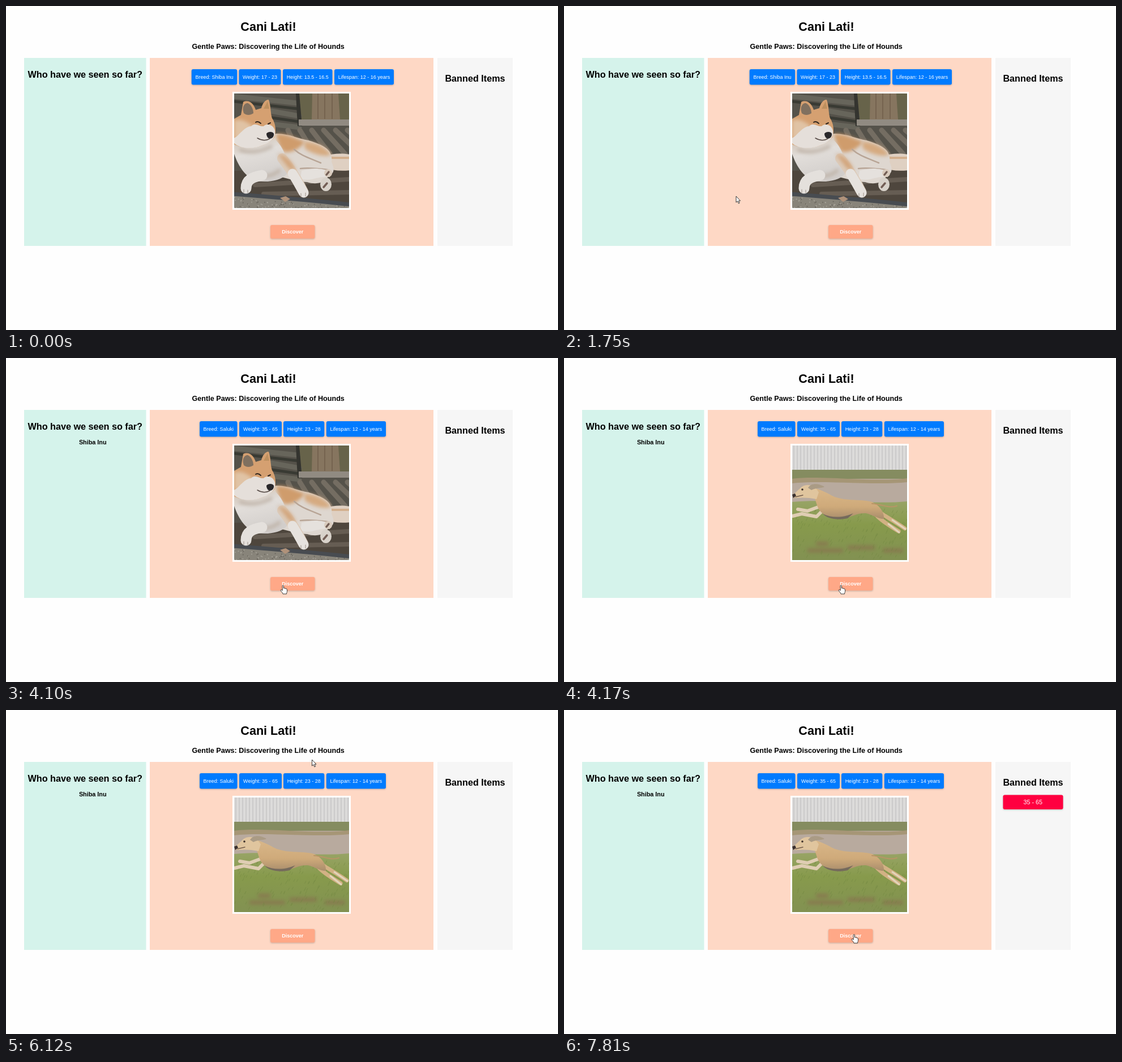
These frames come from a looping animation (975x574 px, 8000 ms). An HTML page:

```html
<!DOCTYPE html>
<html lang="en">
<head>
<meta charset="utf-8">
<title>Dog discovery</title>
<style>
  html, body { margin: 0; width: 100%; height: 100%; overflow: hidden; background: #fefefe; }
  svg { display: block; width: 975px; height: 574px; }
  text { font-family: "Liberation Sans", Arial, sans-serif; text-anchor: middle; }
  .bold { font-weight: 700; }
  .h2 { font-weight: 700; font-size: 16.2px; }
  .small { font-size: 9px; fill: #fff; }
  .raised { filter: drop-shadow(0 1.4px 1.4px rgba(0, 0, 0, .22)); }
  .line { fill: none; stroke-linecap: round; stroke-linejoin: round; }
  .soft { filter: blur(3px); }
</style>
</head>
<body>
<svg viewBox="0 0 975 574">
  <defs>
    <clipPath id="photoClip"><rect x="403" y="155" width="203" height="203"/></clipPath>
    <linearGradient id="chest" x1="0" y1="0" x2=".3" y2="1">
      <stop offset="0" stop-color="#cfc0b1"/><stop offset=".4" stop-color="#e2deda"/><stop offset="1" stop-color="#d2cecb"/>
    </linearGradient>
    <linearGradient id="lawn" x1="0" y1="0" x2="0" y2="1">
      <stop offset="0" stop-color="#98a466"/><stop offset=".4" stop-color="#879a4c"/><stop offset="1" stop-color="#829152"/>
    </linearGradient>
    <linearGradient id="tan" x1="0" y1="0" x2="0" y2="1">
      <stop offset="0" stop-color="#d9b789"/><stop offset=".6" stop-color="#cfaa7a"/><stop offset="1" stop-color="#a98d6c"/>
    </linearGradient>
  </defs>

  <rect width="975" height="574" fill="#fefefe"/>
  <text class="bold" x="463.5" y="44" font-size="21.6">Cani Lati!</text>
  <text class="bold" x="463.2" y="75.5" font-size="12.64">Gentle Paws: Discovering the Life of Hounds</text>

  <rect x="32" y="92" width="215.5" height="333" fill="#d5f3eb"/>
  <rect x="254" y="92" width="501" height="333" fill="#fed8c5"/>
  <rect x="762" y="92" width="133" height="333" fill="#f6f6f6"/>
  <text class="h2" x="139.7" y="127">Who have we seen so far?</text>
  <text class="h2" x="828.5" y="133.8">Banned Items</text>
  <text id="seen" class="bold" x="153.2" y="153.3" font-size="10.8">Shiba Inu</text>
  <g id="banned">
    <rect class="raised" x="775.5" y="150.5" width="106" height="25.5" rx="3" fill="#ff0040"/>
    <text x="828.3" y="166.8" font-size="10.8" fill="#fff">35 - 65</text>
  </g>
  <g id="chipsA"></g>
  <g id="chipsB"></g>

  <rect x="400" y="152" width="209" height="209" fill="#fff"/>
  <g clip-path="url(#photoClip)">
    <g id="shiba">
      <rect x="403" y="155" width="203" height="203" fill="#55524a"/>
      <!-- bench and trees -->
      <rect x="514" y="155" width="92" height="47" fill="#67634a"/>
      <path d="M541 155h46l3 46h-50z" fill="#86755f"/>
      <path d="M551 155v45M563 155v45M576 155v45" stroke="#75634f" stroke-width="2"/>
      <path class="line" d="M403 160L515 172M468 186L518 195M476 210L518 215" stroke="#67655b" stroke-width="9"/>
      <path class="line" d="M403 169L515 182M470 198L518 205" stroke="#393a33" stroke-width="5"/>
      <path d="M512 155h6l5 58h-8z" fill="#34342f"/>
      <path d="M517 201h89v11h-89z" fill="#918b82"/>
      <g id="slats" class="line" stroke="#746d62" stroke-width="9"></g>
      <path d="M403 292L606 287V358H403z" fill="#4e463d"/>
      <path class="line" d="M440 317L606 307M455 333L606 330" stroke="#665d53" stroke-width="8"/>
      <path d="M403 335L606 351V358H403z" fill="#88847a"/>
      <g id="stone"></g>
      <path class="line" d="M400 333C450 337 540 344 610 352" stroke="#484c51" stroke-width="7"/>
      <!-- tail, back and hind legs -->
      <path d="M562 266C580 260 596 261 608 263V291C590 293 575 291 560 286z" fill="#dfd0c2"/>
      <path class="line" d="M574 269L606 269" stroke="#d3b08f" stroke-width="4"/>
      <path d="M466 228C490 222 512 234 534 238C560 246 578 254 575 276C580 288 581 296 570 301C560 316 545 316 532 312C512 311 500 306 478 301z" fill="#ded7d0"/>
      <path class="soft" d="M476 227C495 224 512 235 528 240C520 253 502 262 490 258C482 250 480 238 476 227z" fill="#cf9c6c"/>
      <path class="soft" d="M526 240C548 240 568 252 574 264C560 268 542 262 528 253z" fill="#d5aa80"/>
      <path class="line" d="M509 254C522 266 538 270 556 278M520 288C536 286 552 288 568 290" stroke="#b8a596" stroke-width="2.5"/>
      <path d="M522 292C542 285 560 288 573 293L572 303C552 300 540 312 520 306z" fill="#e5e1dd"/>
      <ellipse cx="569" cy="296" rx="7" ry="7" fill="#d9cbbd"/>
      <ellipse cx="565" cy="316" rx="10" ry="12" fill="#d8d2ca"/>
      <path class="line" d="M566 299l4-5M561 321l6-7" stroke="#735e55" stroke-width="3.5"/>
      <!-- chest and front legs -->
      <path d="M403 237C420 250 455 248 473 235C490 247 500 275 496 298C484 310 464 313 440 310C420 300 409 280 403 262z" fill="url(#chest)"/>
      <path class="soft" d="M412 254C430 262 452 258 470 248M440 300C460 304 474 300 484 290" fill="none" stroke="#bfb3a8" stroke-width="6"/>
      <path class="line" d="M488 270C503 289 515 309 525 329" stroke="#dccab8" stroke-width="18"/>
      <path class="soft" d="M480 262C494 264 506 276 512 292L500 288z" fill="#d2a47a"/>
      <path class="line" d="M506 297C515 311 521 323 526 331" stroke="#e6e2de" stroke-width="17"/>
      <path class="line" d="M452 300C435 303 424 308 424 323" stroke="#e4e0dc" stroke-width="19"/>
      <path class="line" d="M420 331v-6M427 331v-5M521 338v-6M529 337v-6" stroke="#a89d95" stroke-width="1.2"/>
      <!-- head -->
      <path d="M415 193L419 170C430 165 438 174 441 184L451 181C453 172 459 165 464 166C468 177 467 190 470 199C476 207 478 222 474 233C455 254 421 255 403 245V200z" fill="#d5a071"/>
      <path class="soft" d="M403 203C413 198 430 206 436 214L420 238C412 240 406 236 403 232z" fill="#e0c3a5"/>
      <path d="M403 234C412 230 420 214 433 213C440 205 447 214 455 213C460 207 473 210 475 221C477 234 467 243 447 249C427 255 410 250 403 243z" fill="#e5dfda"/>
      <path d="M420 190C416 179 421 172 427 172C434 175 437 184 437 190C431 194 425 194 420 190z" fill="#80705f"/>
      <path d="M455 182L462 169L465 182z" fill="#bd905f"/>
      <path class="line" d="M441 206c3-2 6-1 9 2M463 209l4-2" stroke="#30261f" stroke-width="2"/>
      <path d="M460 226c3-4 11-4 13 0c1 5-3 9-7 9c-3 0-6-4-6-9z" fill="#29272a"/>
      <path class="line" d="M444 234C451 238 459 239 466 235" stroke="#554a45" stroke-width="1.5"/>
      <path d="M484 340l10-3l8 5l-9 5z" fill="#b0927a"/>
    </g>
    <g id="saluki">
      <rect x="403" y="155" width="203" height="46" fill="#dcdbda"/>
      <g id="fence" stroke="#cbcaca" stroke-width="2"></g>
      <rect x="403" y="198" width="203" height="20" fill="#858c60"/>
      <rect x="403" y="214" width="203" height="48" fill="#b8aa9e"/>
      <path d="M403 214C450 207 550 221 606 213V220C550 226 455 216 403 222z" fill="#a69676"/>
      <path d="M403 255C460 249 550 260 606 254V358H403z" fill="url(#lawn)"/>
      <path class="soft" d="M430 341h63M501 336h48M563 341h36M445 329h22" stroke="#89714f" stroke-width="7" opacity=".75"/>
      <g id="grass" class="line" stroke="#6f8540" opacity=".5"></g>
      <path class="line" d="M449 264L430 271L413 268M456 271L446 281L420 276L404 280" stroke="#dfcdb3" stroke-width="6"/>
      <path class="line" d="M545 271C556 285 570 294 591 307M548 267C566 280 581 287 602 302" stroke="#d2b184" stroke-width="7"/>
      <path class="line" d="M573 294L592 309M580 287L603 303" stroke="#e2d5bc" stroke-width="3"/>
      <path d="M437 230C452 231 465 240 478 246C500 254 526 250 544 255C558 261 566 274 565 285C553 285 544 277 533 275C513 274 506 286 483 284C466 284 452 276 447 261z" fill="url(#tan)"/>
      <path d="M457 276C475 285 496 282 511 275L501 284C482 288 466 285 457 276z" fill="#756a5c"/>
      <path class="line" d="M544 258C563 259 573 267 588 262" stroke="#b89567" stroke-width="2"/>
      <path d="M404 243L420 228C430 222 443 225 450 238L446 250C432 247 421 247 408 248z" fill="#e0c59e"/>
      <path d="M431 230C437 221 449 222 460 228C456 231 446 229 437 234z" fill="#aa9b85"/>
      <circle cx="421" cy="233" r="1.8" fill="#3b2f29"/>
      <path d="M403 242l5-2l2 4l-5 4z" fill="#3a302e"/>
      <path class="line" d="M409 246L422 243" stroke="#725b4b" stroke-width="1.5"/>
    </g>
  </g>

  <rect class="raised" x="467" y="388" width="78.5" height="24" rx="3" fill="#ffa887"/>
  <text class="small bold" x="506.2" y="402.8">Discover</text>

  <g id="ring" fill="none">
    <circle r="10" stroke="#000"/><circle r="9" stroke="#fff"/>
  </g>
  <path id="arrow" d="M.5 0V11L3 8.7L4.8 12.8L6.6 12L4.8 8.1H8z" fill="#fff" stroke="#222" stroke-width=".9"/>
  <path id="hand" d="M-1.3 9V.8C-1.3-.8 1-.8 1 .8V5C2 4.2 3.2 4.5 3.2 5.5C4.2 4.8 5.2 5.2 5.3 6.2C6.4 5.8 7 6.5 7 7.5V10.5C7 12.3 6 13 6 15H-.5C-.7 12.7-3 11.3-4.1 9.4C-5 7.8-3.5 6.8-2.3 8z" fill="#fff" stroke="#222" stroke-width=".9"/>
</svg>
<script>
const LOOP = 8000, NS = "http://www.w3.org/2000/svg";
const $ = id => document.getElementById(id);
const show = (id, on) => $(id).setAttribute("display", on ? "inline" : "none");

function add(parent, tag, attrs, label = "") {
  const node = document.createElementNS(NS, tag);
  for (const key in attrs) node.setAttribute(key, attrs[key]);
  node.textContent = label;
  parent.append(node);
}

function addChips(id, chips) {
  for (const [x, width, label] of chips) {
    add($(id), "rect", { class: "raised", x, y: 112, width, height: 27.5, rx: 3, fill: "#007bff" });
    add($(id), "text", { class: "small", x: x + width / 2, y: 129.1 }, label);
  }
}
addChips("chipsA", [
  [327.7, 80.5, "Breed: Shiba Inu"], [411.5, 74, "Weight: 17 - 23"],
  [489, 87.5, "Height: 13.5 - 16.5"], [580, 105, "Lifespan: 12 - 16 years"]
]);
addChips("chipsB", [
  [342, 66.5, "Breed: Saluki"], [412, 75, "Weight: 35 - 65"],
  [490, 72.3, "Height: 23 - 28"], [565.8, 105.2, "Lifespan: 12 - 14 years"]
]);

let seed = 7;
const random = () => (seed = seed * 16807 % 2147483647) / 2147483647;

for (let i = 0; i < 6; i++)
  add($("slats"), "path", { d: `M${498 + i * 21} 220L${518 + i * 27} 262` });
for (let i = 0; i < 150; i++) {
  const x = 403 + random() * 203, edge = 339 + (x - 403) * 0.08;
  add($("stone"), "circle", { cx: x, cy: edge + random() * 20, r: 1, fill: i % 2 ? "#a7a399" : "#68645c" });
}
for (let x = 406; x < 606; x += 6)
  add($("fence"), "path", { d: `M${x} 155V199` });
for (let i = 0; i < 160; i++)
  add($("grass"), "path", { d: `M${403 + random() * 203} ${270 + random() * 88}l2-4` });

// Each move: start, end, step count, then [step, x, y] points; a point without x leaves the stage.
const moves = [
  [190, 530, 6, [[1, 933, 561], [2, 770, 450], [5, 274, 132], [6, 282, 146]]],
  [730, 940, 4, [[1, 258, 118], [3, 131, 1], [4]]],
  [1400, 1600, 4, [[1, 12, 258], [3, 245, 350], [4, 286, 361]]],
  [1750, 2490, 12, [[1, 303.5, 337], [2, 315, 334], [6, 414, 386], [10, 480, 414], [12, 489.5, 403]]],
  [4920, 5720, 13, [[2, 505, 398], [8, 598, 359], [11, 645, 240], [13, 661, 173]]],
  [5790, 6460, 11, [[2, 650, 125], [4, 610, 80], [8, 470, 96], [11, 438.5, 123]]],
  [7130, 7810, 10, [[1, 441, 136], [5, 478, 270], [8, 508, 378], [10, 512.5, 398]]]
];

function cursorAt(time) {
  let position = null;
  for (const [start, end, count, points] of moves) {
    if (time < start) break;
    const pace = (end - start) / (count - 1);
    const step = Math.min(count, Math.floor((time - start) / pace + 0.08) + 1);
    let from = position ? [0, ...position] : null;
    for (const to of points) {
      if (step >= to[0]) {
        position = to.length > 1 ? to.slice(1) : null;
        from = to;
        continue;
      }
      if (from && to.length > 1) {
        const part = (step - from[0]) / (to[0] - from[0]);
        position = [1, 2].map(i => from[i] + (to[i] - from[i]) * part);
      }
      break;
    }
  }
  return position;
}

const within = (x, y, left, top, right, bottom) => x >= left && x <= right && y >= top && y <= bottom;
const clickable = (x, y) => within(x, y, 467, 388, 545, 412) || within(x, y, 342, 112, 671, 139);
const during = (time, start, end) => time >= start && time < end;

function render(time) {
  const fetched = time >= 4100;
  show("seen", fetched);
  show("chipsA", !fetched);
  show("chipsB", fetched);
  show("shiba", time < 4170);
  show("saluki", time >= 4170);
  show("banned", time >= 6730);

  const cursor = cursorAt(time);
  const hand = cursor && clickable(...cursor);
  show("arrow", cursor && !hand);
  show("hand", hand);
  show("ring", during(time, 3440, 3510) || during(time, 6660, 6730));
  if (cursor)
    for (const id of ["arrow", "hand", "ring"]) $(id).setAttribute("transform", `translate(${cursor})`);
}

const origin = performance.now();
function frame() {
  render((performance.now() - origin) % LOOP);
  requestAnimationFrame(frame);
}
frame();
</script>
</body>
</html>
```
